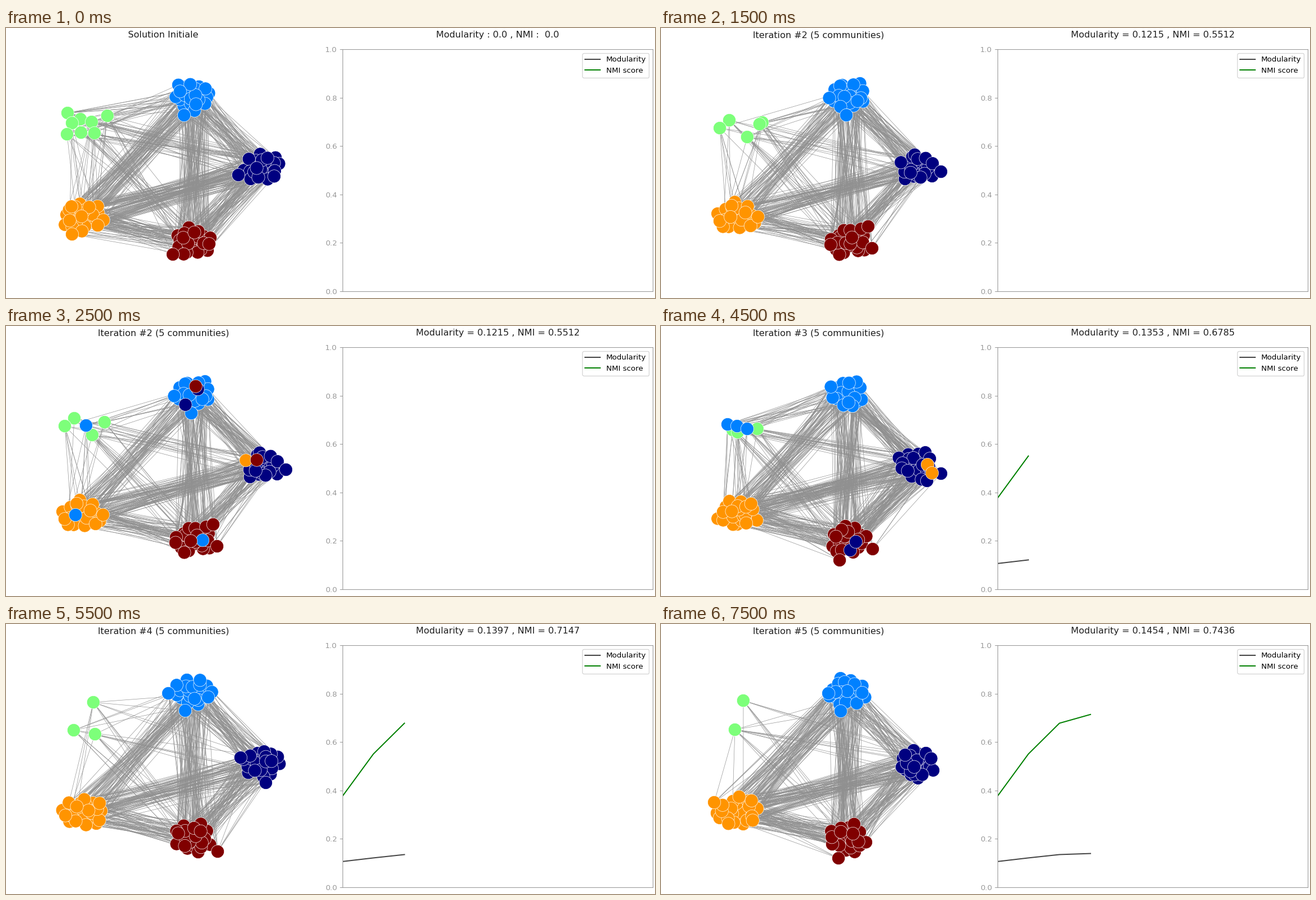
A matplotlib script for the animation above (8 s loop, 1159x483 px).

```python
import matplotlib.pyplot as plt
import numpy as np
from matplotlib.animation import FuncAnimation
from matplotlib.collections import LineCollection

W, H, DPI = 1159, 483, 96
K = W / 12 / DPI  # everything is sized for a figure 12 inches wide
COLORS = plt.cm.jet(np.linspace(0, 1, 5))
NAVY, BLUE, GREEN, ORANGE, RED = range(5)
CENTERS = np.array([(457, 250), (334, 121), (140, 172), (137, 337), (334, 383)])
RADII = {NAVY: (33, 26), BLUE: (33, 25), ORANGE: (38, 27), RED: (34, 26)}
CORE = 24
GOLDEN = np.pi * (3 - 5**0.5)
GRAY = "#999999"
INK = "#1e1e1e"


def disc(rng, center, radii):
    """Jittered sunflower spiral filling an ellipse, in random order."""
    k = np.arange(CORE)
    angle = k * GOLDEN + rng.uniform(0, 2 * np.pi)
    ring = np.sqrt((k + 0.5) / CORE)
    unit = np.column_stack([ring * np.cos(angle), ring * np.sin(angle)])
    unit += rng.normal(0, 0.07, unit.shape)
    return rng.permutation(center + unit * radii)


def network(seed, strays, gone=0, swaps=0, joins=()):
    """Random graph on five clusters; returns its state before and after the moves.

    Strays belong to the nearest cluster. Then `gone` green nodes leave,
    `swaps` nodes trade places and each join brings a node to a new spot.
    """
    rng = np.random.default_rng(seed)
    strays = np.array(strays, float)
    pos = np.vstack([disc(rng, CENTERS[c], r) for c, r in RADII.items()] + [strays])
    home = np.linalg.norm(strays[:, None] - CENTERS, axis=2).argmin(axis=1)
    group = np.concatenate([np.repeat(list(RADII), CORE), home])
    core = np.arange(len(RADII) * CORE)
    depth = np.ones(len(pos))
    depth[core] = 0

    i, j = np.triu_indices(len(pos), 1)
    chance = np.where(group[i] == group[j], 0.25, 0.12)
    edges = np.column_stack([i, j])[rng.random(len(i)) < chance]

    moved, moved_depth = pos.copy(), depth.copy()
    traders = rng.choice(core, swaps, replace=False)
    moved[traders], moved_depth[traders] = pos[np.roll(traders, 1)], 2
    leaving = np.flatnonzero(group == GREEN)[:gone]
    moved[leaving], moved_depth[leaving] = pos[rng.choice(core, gone)], -1
    for k, (c, x, y) in enumerate(joins):
        node = core[group[core] == c][k]
        moved[node], moved_depth[node] = (x, y), 2
    return [(p, np.argsort(d, kind="stable"), group, edges)
            for p, d in ((pos, depth), (moved, moved_depth))]


first = network(
    3,
    [(110, 152), (133, 163), (153, 168), (181, 157), (118, 170), (109, 190),
     (134, 187), (158, 188), (415, 263), (318, 156), (298, 405), (118, 369)],
    gone=4, swaps=12, joins=[(BLUE, 150, 172)])
second = network(
    8,
    [(181, 169), (176, 172), (122, 165), (105, 179), (154, 195),
     (500, 257), (331, 156), (377, 394), (370, 355)],
    gone=1, swaps=9, joins=[(BLUE, 143, 178)])
third = network(
    5,
    [(93, 176), (124, 159), (168, 154), (128, 186), (137, 190), (172, 184),
     (500, 264), (475, 277), (378, 399), (319, 419)],
    gone=3,
    joins=[(BLUE, 119, 176), (BLUE, 136, 179), (BLUE, 154, 184), (ORANGE, 476, 248),
           (ORANGE, 484, 263), (NAVY, 338, 401), (NAVY, 348, 386)])
fourth = network(
    11,
    [(159, 197), (156, 140), (121, 190),
     (419, 239), (464, 284), (290, 124), (320, 155), (378, 407)],
    gone=1, swaps=7)
fifth = network(
    14,
    [(147, 137), (132, 189), (299, 124), (321, 156), (95, 319), (317, 419)])
STATES = first + second + third + fourth + fifth
MODULARITY = [0.1065, 0.1215, 0.1353, 0.1397, 0.1454]
NMI = [0.3758, 0.5512, 0.6785, 0.7147, 0.7436]

fig = plt.figure(figsize=(W / DPI, H / DPI), dpi=DPI, facecolor="white")

# Full-size axes in pixels for the graph and both titles
stage = fig.add_axes([0, 0, 1, 1])
stage.set(xlim=(0, W), ylim=(H, 0))
stage.axis("off")
lines = stage.add_collection(
    LineCollection([], colors="#909090", linewidths=0.5 * K, zorder=1))
dots = stage.scatter([], [], s=300 * K**2, edgecolors="white",
                     linewidths=0.5 * K, zorder=2)
left_title, right_title = (
    stage.text(x, 17, "", ha="center", va="baseline", size=12 * K, color=INK)
    for x in (281, 878))

chart = fig.add_axes([600.6 / W, 1 - 471 / H, 554.6 / W, 432.6 / H])
chart.set(xlim=(0, 10), ylim=(0, 1), xticks=[], facecolor="none")
chart.tick_params(axis="y", color=GRAY, labelcolor=GRAY, labelsize=10 * K,
                  length=3.5 * K, pad=3.5 * K, width=0.8 * K)
for spine in chart.spines.values():
    spine.set(color=GRAY, linewidth=0.8 * K)
mod_line, = chart.plot([], [], color="#444444", lw=1.5 * K, label="Modularity")
nmi_line, = chart.plot([], [], color="green", lw=1.5 * K, label="NMI score")
chart.legend(loc="upper right", fontsize=10 * K)


def update(frame):
    state = (frame + 1) // 2
    step = state // 2
    pos, order, group, edges = STATES[state]
    lines.set_segments(pos[edges])
    dots.set_offsets(pos[order])
    dots.set_facecolors(COLORS[group[order]])
    if state == 0:
        left_title.set_text("Solution Initiale")
        right_title.set_text("Modularity : 0.0 , NMI :  0.0")
    else:
        left_title.set_text(f"Iteration #{step + 1} (5 communities)")
        right_title.set_text(
            f"Modularity = {MODULARITY[step]:.4f} , NMI = {NMI[step]:.4f}")
    mod_line.set_data(range(step), MODULARITY[:step])
    nmi_line.set_data(range(step), NMI[:step])
    return lines, dots, left_title, right_title, mod_line, nmi_line


anim = FuncAnimation(fig, update, frames=16, interval=500, repeat=True, repeat_delay=0)
plt.show()
```
